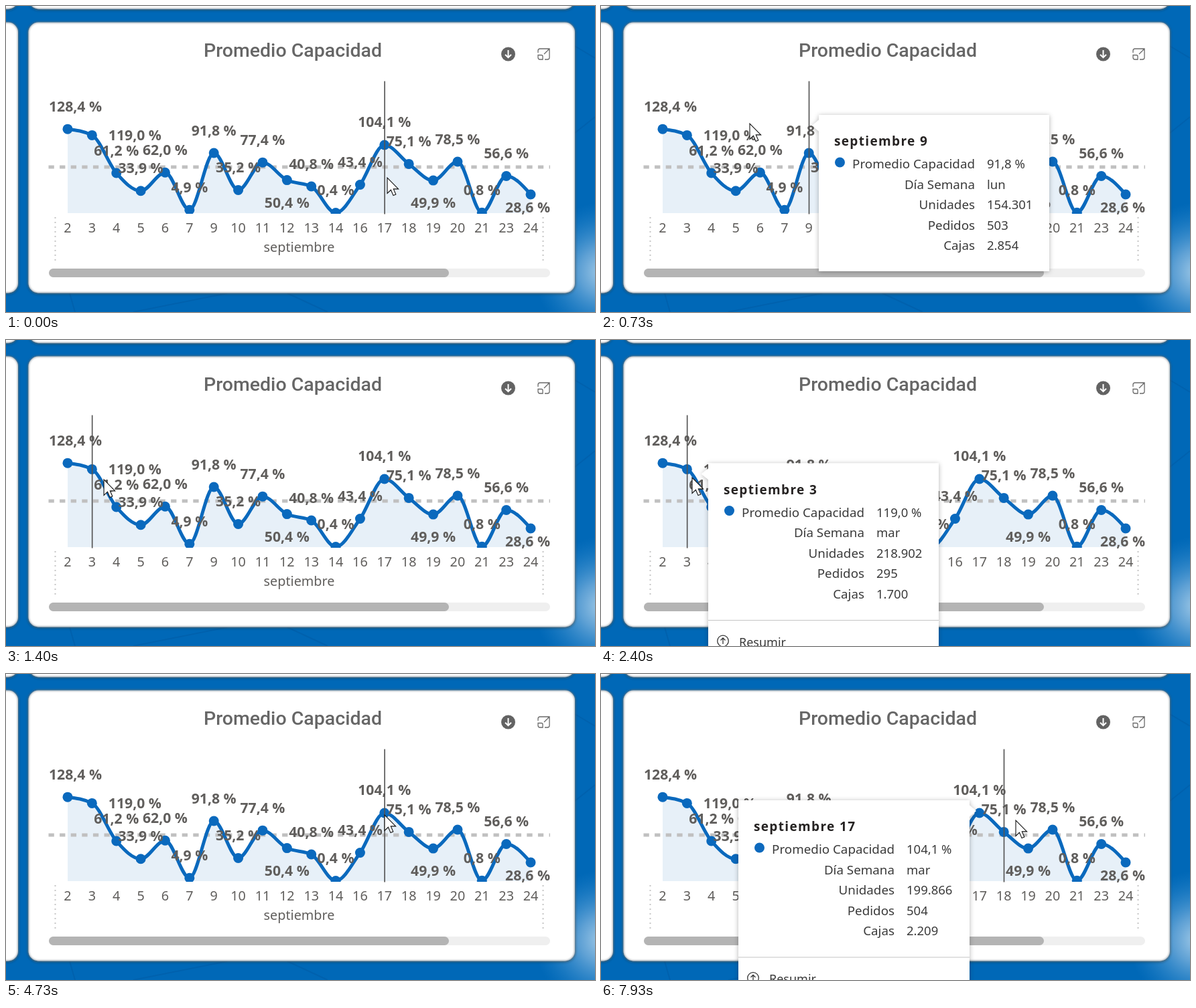
An HTML page for the animation above (8000 ms loop, 879x458 px).

```html
<!DOCTYPE html>
<html lang="es">
<head>
<meta charset="utf-8">
<title>Promedio Capacidad</title>
<style>
  html, body { margin: 0; width: 100%; height: 100%; overflow: hidden; background: #0068b7; }
  svg { display: block; width: 100%; height: 100%; font-family: "Noto Sans", "Open Sans", sans-serif; }
  .card { fill: #fff; filter: url(#cardShadow); }
  .rim { fill: none; stroke: #7d8891; stroke-width: 2.4; stroke-opacity: .6; filter: url(#soft); }
  .title { font: 500 28.5px Roboto, sans-serif; fill: #666; }
  .axis { font-size: 19.8px; fill: #605e5c; }
  .value { font-size: 21.2px; font-weight: 700; fill: #605e5c; }
  .mid { text-anchor: middle; }
  .end { text-anchor: end; }
  .tip { filter: url(#tipShadow); }
  .tip text { font-size: 18.8px; fill: #3a3a3a; }
  .tip .num { font-size: 18.5px; }
  .tip .head { font-size: 19px; font-weight: 700; letter-spacing: 1.35px; fill: #252423; }
  .tip .link { font-size: 18px; }
</style>
</head>
<body>
<svg viewBox="0 0 879 458" preserveAspectRatio="none">
  <defs>
    <radialGradient id="glow" gradientUnits="userSpaceOnUse" cx="892" cy="398" r="104">
      <stop offset="0" stop-color="#a9cfea"/>
      <stop offset=".35" stop-color="#7db3de" stop-opacity=".75"/>
      <stop offset="1" stop-color="#2f8bd0" stop-opacity="0"/>
    </radialGradient>
    <filter id="cardShadow" filterUnits="userSpaceOnUse" x="-80" y="-80" width="1040" height="620">
      <feDropShadow dx="0" dy="1" stdDeviation="2" flood-color="#10202c" flood-opacity=".7"/>
    </filter>
    <filter id="soft" filterUnits="userSpaceOnUse" x="-80" y="-80" width="1040" height="620">
      <feGaussianBlur stdDeviation="1"/>
    </filter>
    <filter id="tipShadow" filterUnits="userSpaceOnUse" x="-30" y="-30" width="420" height="500">
      <feDropShadow dx="0" dy="1" stdDeviation="3.5" flood-color="#000" flood-opacity=".3"/>
    </filter>
    <clipPath id="plot"><rect x="60" y="100" width="760" height="211"/></clipPath>
  </defs>

  <rect width="879" height="458" fill="#0068b7"/>
  <g fill="none" stroke="#00549c" stroke-opacity=".35" stroke-width="2">
    <path d="M95 430l8 28M190 458l140-28M420 430l60 28M849 60l30 18M849 190l30-24"/>
  </g>
  <rect width="879" height="458" fill="url(#glow)"/>
  <g id="cards"></g>

  <text class="title mid" x="428" y="76.300">Promedio Capacidad</text>
  <circle cx="749.500" cy="72" r="10.500" fill="#636363"/>
  <path d="M749.500 66v11M745 72.700l4.500 4.500 4.500-4.500" fill="none" stroke="#fff" stroke-width="2"/>
  <path d="M794 70v-3a3 3 0 0 1 3-3h11a3 3 0 0 1 3 3v10a3 3 0 0 1-3 3h-4M794 73.500h5a2 2 0 0 1 2 2v4.500h-4a3 3 0 0 1-3-3zM803 72l8-8M805 64h6v6"
        fill="none" stroke="#6a6a6a" stroke-width="1.300"/>

  <g id="chart"></g>
  <path d="M73.500 316v66M801.500 316v66" stroke="#c6c6c6" stroke-width="2" stroke-dasharray="2 5"/>
  <text class="axis mid" x="437.500" y="368">septiembre</text>
  <rect x="64" y="393" width="748" height="13" rx="6.500" fill="#efefef"/>
  <rect x="64" y="393" width="597" height="13" rx="6.500" fill="#b4b4b4"/>

  <path id="ruler" d="M0 112.500V311.500" stroke="#555" stroke-width="1.660"/>
  <g id="tips"></g>
  <path id="cursor" d="M0 0V23.500L5.400 18.300L9 26.600L12.800 25L9.300 16.900H16.600Z" fill="#fff" stroke="#111" stroke-width="1.100"/>
</svg>
<script>
const LOOP = 8000, STEP = 1000 / 15, BLUE = '#0a69bd';
const $ = id => document.getElementById(id);

function add(parent, tag, attrs, text) {
  const el = document.createElementNS('http://www.w3.org/2000/svg', tag);
  for (const k in attrs) el.setAttribute(k, attrs[k]);
  if (text !== undefined) el.textContent = text;
  return parent.appendChild(el);
}

function drawCard(x, y, width, height) {
  add($('cards'), 'rect', { class: 'card', x, y, width, height, rx: 15 });
  add($('cards'), 'rect', { class: 'rim', x, y, width, height, rx: 15 });
}

// Series
const days = [2, 3, 4, 5, 6, 7, 9, 10, 11, 12, 13, 14, 16, 17, 18, 19, 20, 21, 23, 24];
const rates = [128.4, 119, 61.2, 33.9, 62, 4.9, 91.8, 35.2, 77.4, 50.4,
               40.8, 0.4, 43.4, 104.1, 75.1, 49.9, 78.5, 0.8, 56.6, 28.6];
const GAP = 36.37;
const px = i => 92 + i * GAP;
const py = i => 310 - rates[i] * 0.98;
const percent = v => v.toFixed(1).replace('.', ',') + ' %';

// Label offsets that differ from "34 above the point"
const shifts = { 2: [11.5, -34], 3: [64, 0], 12: [0, 33.5], 19: [0, 33.5], 24: [-4.5, 19.5] };

// Monotone cubic through all points
function curve() {
  const last = days.length - 1;
  const rise = i => (py(i + 1) - py(i)) / GAP;
  const inner = i => {
    const a = rise(i - 1), b = rise(i);
    return (Math.sign(a) + Math.sign(b)) * Math.min(Math.abs(a), Math.abs(b), Math.abs(a + b) / 4);
  };
  const slope = i => i === 0 ? (3 * rise(0) - inner(1)) / 2
    : i === last ? (3 * rise(last - 1) - inner(last - 1)) / 2 : inner(i);
  const h = GAP / 3;
  let d = `M${px(0)} ${py(0)}`;
  for (let i = 0; i < last; i++) {
    d += `C${px(i) + h} ${py(i) + h * slope(i)} ${px(i + 1) - h} ${py(i + 1) - h * slope(i + 1)} ${px(i + 1)} ${py(i + 1)}`;
  }
  return d;
}

function drawChart() {
  const g = $('chart'), d = curve();
  const plot = add(g, 'g', { 'clip-path': 'url(#plot)' });
  add(plot, 'path', { d: `${d}V310H92Z`, fill: '#e7f0f8' });
  add(plot, 'path', { d: 'M63.5 241H812', stroke: '#c0c0c0', 'stroke-width': 5, 'stroke-dasharray': 8.3 });
  add(plot, 'path', { d, fill: 'none', stroke: BLUE, 'stroke-width': 5 });
  days.forEach((day, i) => add(plot, 'circle', { cx: px(i), cy: py(i), r: 7.5, fill: BLUE }));
  days.forEach((day, i) => {
    const [dx, dy] = shifts[day] || [0, -34];
    add(g, 'text', { class: 'value mid', x: px(i) + dx, y: py(i) + dy + 7.5 }, percent(rates[i]));
    add(g, 'text', { class: 'axis mid', x: px(i), y: 338.5 }, day);
  });
}

// Tooltips: visible from..to, footer appears at "more"
const tips = [
  { day: 9, x: 325, y: 163, w: 344, from: 670, to: 870, rows: ['lun', '154.301', '503', '2.854'] },
  { day: 4, x: 199, y: 189, w: 333, from: 1000, to: 1270, rows: ['mié', '97.972', '502', '2.682'] },
  { day: 3, x: 160, y: 184.5, w: 344, from: 1530, to: 4400, more: 2400, rows: ['mar', '218.902', '295', '1.700'] },
  { day: 17, x: 205, y: 189, w: 345, from: 5130, to: LOOP, more: 5930, flip: true, rows: ['mar', '199.866', '504', '2.209'] }
];
const names = ['Promedio Capacidad', 'Día Semana', 'Unidades', 'Pedidos', 'Cajas'];

function drawTip(tip) {
  const g = tip.el = add($('tips'), 'g', { class: 'tip', transform: `translate(${tip.x} ${tip.y})` });
  tip.box = add(g, 'rect', { width: tip.w, height: 234, fill: '#fff' });
  add(g, 'path', { d: tip.flip ? `M${tip.w - 1} 7l11 9l-11 9z` : 'M1 7l-11 9l11 9z', fill: '#fff' });
  add(g, 'text', { class: 'head', x: 23, y: 46 }, 'septiembre ' + tip.day);
  add(g, 'circle', { cx: 31.5, cy: 71, r: 7.5, fill: BLUE });
  const values = [percent(rates[days.indexOf(tip.day)]), ...tip.rows];
  values.forEach((value, i) => {
    const y = 80.3 + i * 30.5;
    add(g, 'text', { class: 'end', x: 233, y }, names[i]);
    add(g, 'text', { class: 'num', x: 251, y }, value);
  });
  if (!tip.more) return;
  tip.foot = add(g, 'g', {});
  add(tip.foot, 'path', { d: `M0 235H${tip.w}`, stroke: '#c4c4c4', 'stroke-width': 1.2 });
  add(tip.foot, 'circle', { cx: 22, cy: 266, r: 8.3, fill: 'none', stroke: '#333', 'stroke-width': 1.3 });
  add(tip.foot, 'path', { d: 'M22 270.5v-9M18.5 265l3.5-3.5 3.5 3.5', fill: 'none', stroke: '#333', 'stroke-width': 1.3 });
  add(tip.foot, 'text', { class: 'link', x: 46, y: 274 }, 'Resumir');
}

// Pointer path: time, x, y
const path = [
  [0, 569, 257], [270, 569, 257], [600, 312, 195], [730, 222, 176], [930, 172, 200],
  [1130, 167, 215], [1530, 136, 206], [3200, 136, 206], [4070, 511, 197], [4270, 544, 192],
  [4730, 565, 211], [7800, 565, 211], [7930, 619, 219], [LOOP, 619, 219]
];

function pointer(t) {
  const i = Math.max(1, path.findIndex(p => p[0] >= t));
  const [t0, x0, y0] = path[i - 1], [t1, x1, y1] = path[i];
  const f = Math.max(0, (t - t0) / (t1 - t0));
  const e = t1 - t0 > 500 ? (1 - Math.cos(Math.PI * f)) / 2 : f;
  return [x0 + (x1 - x0) * e, y0 + (y1 - y0) * e];
}

const show = (el, on) => el.setAttribute('visibility', on ? 'inherit' : 'hidden');

function render(time) {
  // Motion advances at 15 steps per second
  const step = Math.floor((time % LOOP + 4) / STEP);
  const t = Math.round(step * STEP / 10) * 10 % LOOP;
  const [x, y] = pointer(t);
  $('cursor').setAttribute('transform', `translate(${x} ${y})`);

  // The ruler trails the first fast sweep
  const seen = t < 1000 ? pointer(Math.max(0, t - 130))[0] : x;
  $('ruler').setAttribute('transform', `translate(${px(Math.round((seen - 92) / GAP)) + 0.3} 0)`);

  for (const tip of tips) {
    show(tip.el, t >= tip.from && t < tip.to);
    if (!tip.foot) continue;
    show(tip.foot, t >= tip.more);
    tip.box.setAttribute('height', t >= tip.more ? 300 : 234);
  }
}

drawCard(-60, -50, 78, 54.5);
drawCard(34, -50, 815, 54.5);
drawCard(-60, 24.5, 78, 405);
drawCard(33.5, 24.5, 815.5, 405);
drawChart();
tips.forEach(drawTip);
const start = performance.now();
function tick() {
  render(performance.now() - start);
  requestAnimationFrame(tick);
}
tick();
</script>
</body>
</html>
```
